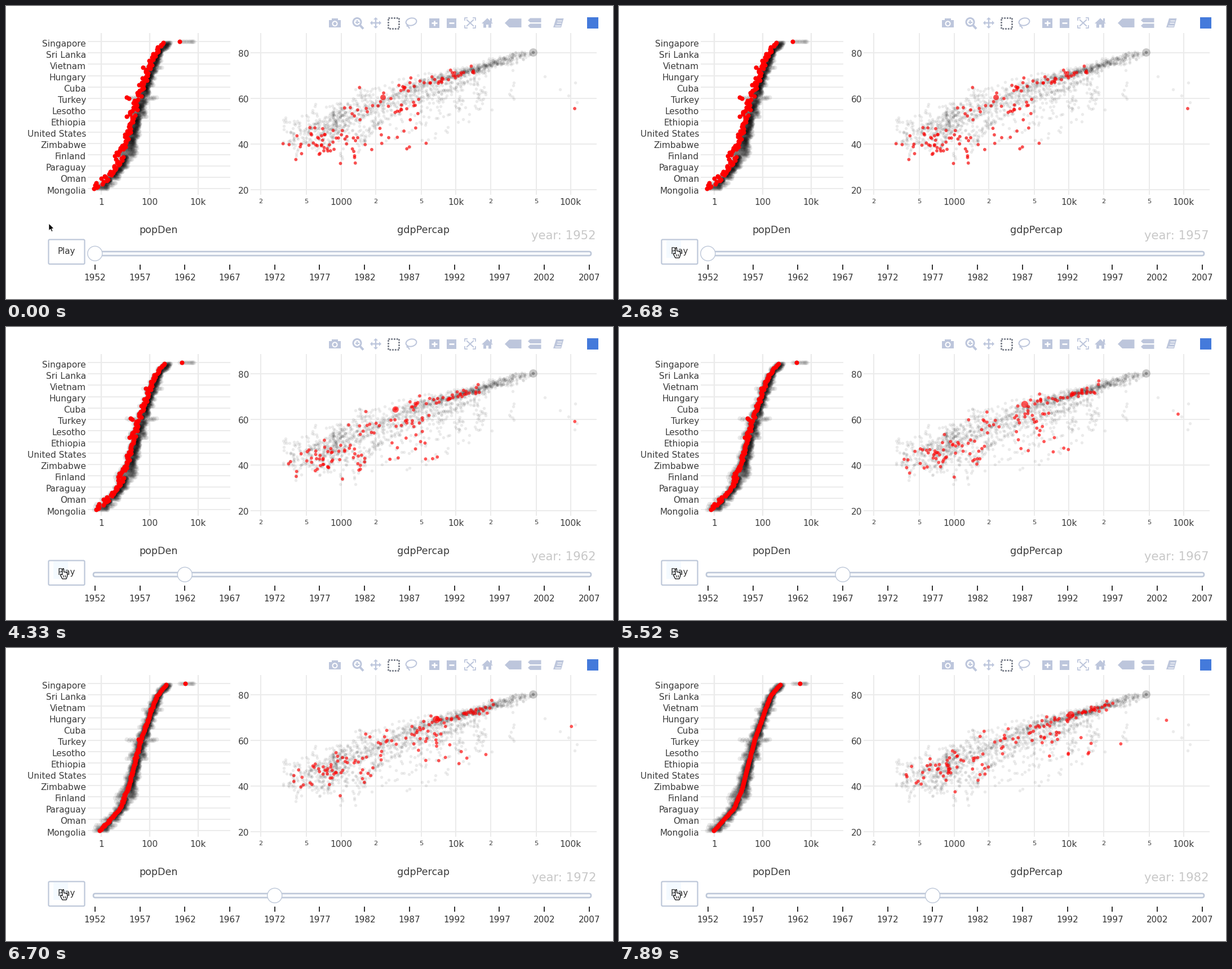
A matplotlib script that plays this animation: 1077x520 px, repeating every 8 s.

```python
import numpy as np
import matplotlib.pyplot as plt
from matplotlib.animation import FuncAnimation
from matplotlib.patches import Circle, Ellipse, FancyBboxPatch, Polygon

W, H, DPI = 1077, 520, 100
PX = 72 / DPI                      # points per pixel
STEP, LOOP = 50, 8000
TICK = LOOP / 54                   # the picture changes only on these beats
INK, RULE, ICON, GRID = "#3c3c3c", "#bec8d9", "#bdc6dc", "#ebebeb"

rng = np.random.default_rng(7)
plt.rcParams["font.family"] = "DejaVu Sans"
fig = plt.figure(figsize=(W / DPI, H / DPI), dpi=DPI, facecolor="white")
ax = fig.add_axes([0, 0, 1, 1])
ax.set(xlim=(0, W), ylim=(H, 0))
ax.axis("off")


# ---- drawing helpers, all in pixels ----
def line(xs, ys, color=ICON, lw=2, z=2, **kw):
    kw.setdefault("solid_capstyle", "butt")
    return ax.plot(xs, ys, color=color, lw=lw * PX, zorder=z, **kw)[0]


def shape(pts, fc=ICON, ec="none", lw=0, z=2):
    return ax.add_patch(Polygon(pts, fc=fc, ec=ec, lw=lw * PX, zorder=z))


def box(x0, y0, x1, y1, **kw):
    return shape([(x0, y0), (x1, y0), (x1, y1), (x0, y1)], **kw)


def disc(x, y, r, fc=ICON, ec="none", lw=0, z=2):
    return ax.add_patch(Circle((x, y), r, fc=fc, ec=ec, lw=lw * PX, zorder=z))


def pill(x0, y0, x1, y1, r, fc, lw):
    style = f"round,pad=0,rounding_size={r}"
    ax.add_patch(FancyBboxPatch((x0, y0), x1 - x0, y1 - y0, boxstyle=style,
                                fc=fc, ec=RULE, lw=lw * PX, zorder=4))


def text(x, y, s, size=15.4, ha="center", color=INK, z=6):
    return ax.text(x, y, s, fontsize=size * PX, ha=ha, va="baseline",
                   color=color, zorder=z)


def dots(x, y, r, color, alpha, z):
    return ax.scatter(x, y, s=(2 * np.asarray(r) * PX) ** 2, c=color,
                      alpha=alpha, linewidths=0, zorder=z)


# ---- axes ----
ROWS, ROW_TOP, ROW_GAP = 131, 63.3, 2.007


def gdp_x(v):
    return 594.5 + 203.7 * (np.log10(v) - 3)


def life_y(v):
    return 83 + (80 - v) * 4.05


def draw_axes():
    names = ["Singapore", "Sri Lanka", "Vietnam", "Hungary", "Cuba", "Turkey",
             "Lesotho", "Ethiopia", "United States", "Zimbabwe", "Finland",
             "Paraguay", "Oman", "Mongolia"]
    for k, name in enumerate(names):
        y = ROW_TOP + 10 * ROW_GAP * k
        line([145, 398], [y, y], GRID, 2, 1)
        text(142, y + 8.3, name, ha="right")
    for x, s in [(169, "1"), (255, "100"), (341, "10k")]:
        line([x, x], [48, 335], GRID, 2.4, 1)
        text(x, 353, s)

    for v in (20, 40, 60, 80):
        line([434, 1048], [life_y(v)] * 2, GRID, 2, 1)
        text(431, life_y(v) + 7, str(v), ha="right")
    for power in (2, 3, 4, 5):
        for lead in (1, 2, 5):
            x = gdp_x(lead * 10 ** power)
            if not 440 < x < 1040:
                continue
            line([x, x], [48, 335], GRID, 2, 1)
            if lead == 1:
                text(x, 353, {3: "1000", 4: "10k", 5: "100k"}[power])
            else:
                text(x, 350, str(lead), 11.4)
    text(271, 403, "popDen", 17.5)
    text(740.5, 403, "gdpPercap", 17.5)


# ---- toolbar ----
def draw_toolbar():
    box(573, 25, 594, 38)
    box(578, 22, 589, 26)
    disc(583.5, 31.3, 5, "white")
    disc(583.5, 31.3, 3)

    disc(623, 28.5, 7, "none", ICON, 3)
    line([628, 634], [34, 40.5], lw=4)
    line([619.5, 626.5], [28.5, 28.5])
    line([623, 623], [25, 32])

    line([649, 663], [30, 30], lw=2.4)
    line([656, 656], [23, 37], lw=2.4)
    for dx, dy in ((1, 0), (-1, 0), (0, 1), (0, -1)):
        shape([(656 + 10 * dx, 30 + 10 * dy),
               (656 + 6 * dx + 4 * dy, 30 + 6 * dy + 4 * dx),
               (656 + 6 * dx - 4 * dy, 30 + 6 * dy - 4 * dx)])

    line([678, 697, 697, 678, 678], [21, 21, 39.5, 39.5, 21], "#767b87", 2.8,
         linestyle=(0, (1, 0.7)), dash_capstyle="butt")

    ax.add_patch(Ellipse((719, 28), 19, 13, angle=-12, fc="none", ec=ICON,
                         lw=2 * PX, zorder=2))
    line([712, 711.5, 714, 716], [32, 35.5, 36.5, 40])

    for x in (751, 781.5):
        box(x, 22, x + 17.5, 38.5)
        line([x + 4, x + 13.5], [30.2, 30.2], "white", 2.6, 3)
    line([759.8, 759.8], [25.5, 35], "white", 2.6, 3)

    for sx in (-1, 1):
        for sy in (-1, 1):
            cx, cy = 823.5 + 9.5 * sx, 30 + 9 * sy
            line([cx - 5 * sx, cx, cx], [cy, cy, cy - 5 * sy], lw=1.8)
            line([823.5, 823.5 + 6.5 * sx], [30, 30 + 6 * sy], lw=2)

    shape([(844, 31), (854, 21.5), (864, 31), (861, 31), (861, 38.5),
           (856, 38.5), (856, 33), (852, 33), (852, 38.5), (847, 38.5),
           (847, 31)])
    box(859, 22, 861.5, 28)

    shape([(885, 30.2), (893, 22.3), (914.5, 22.3), (914.5, 38), (893, 38)])
    for y in (21.5, 31.3):
        shape([(926, y + 3.8), (930, y), (949.5, y), (949.5, y + 7.6),
               (930, y + 7.6)])

    shape([(976, 22), (989.5, 22), (985, 38), (971, 38)])
    line([977.5, 986], [26, 26], "white", 1.3, 3)
    line([976.5, 985], [29.5, 29.5], "white", 1.3, 3)
    line([973.5, 983.5], [35.2, 35.2], "white", 1.3, 3)

    box(1031, 20, 1051, 40, fc="#447adb")


# ---- button and slider ----
def slider_x(k):
    return 157.8 + 79.73 * k


def draw_controls():
    pill(75.5, 414.5, 139.5, 458, 2, "white", 2.2)
    text(107, 440.3, "Play", 15, color="#333333")
    pill(155, 435.8, 1038, 443, 3.5, "#f8fafc", 2.6)
    for k in range(12):
        x = slider_x(k)
        line([x, x], [458.5, 467.5], "#333333", 2, 4)
        text(x, 487, str(1952 + 5 * k), 15.2, color="#333333")


# ---- density panel: rows sorted by their long-run mean ----
row_y = ROW_TOP + ROW_GAP * np.arange(ROWS)
row_mid = np.interp(row_y, [65, 85, 125, 165, 210, 250, 285, 325],
                    [286, 269, 254, 240, 228.5, 218.5, 204, 168])
row_rate = (np.interp(row_y, [63, 150, 170, 324], [1.9, 1.5, 2.3, 2.3])
            * rng.gamma(4, 0.25, ROWS))
row_mid[0], row_rate[0] = 321, 2.9
row_rate[49] = 6.2                 # the one country that fills up fastest


def density_x(p):
    slowed = p - 0.02 * p ** 2
    return row_mid + row_rate * (slowed - 4.4)


# ---- wealth and life panel: p counts five-year periods since 1952 ----
def frontier(x):
    return np.interp(x, [500, 600, 700, 800, 870, 935],
                     [190, 160, 140, 119, 98, 82])


def make_countries():
    """Start points, growth and catch-up rate of each group of countries."""
    poor, middle, rich, oil = 48, 38, 34, 8
    n = poor + middle + rich + oil
    x = np.concatenate([
        np.maximum(rng.normal(562, 36, poor), 488 + 20 * rng.random(poor)),
        rng.uniform(595, 735, middle),
        rng.uniform(695, 835, rich),
        rng.uniform(640, 760, oil)])
    y = np.concatenate([
        rng.normal(247, 17, poor),
        rng.normal(225 - 0.36 * (x[poor:poor + middle] - 595), 28),
        frontier(x[-rich - oil:-oil]) + rng.normal(7, 7, rich),
        rng.uniform(215, 258, oil)])
    y = np.maximum(y, frontier(x) - 10)
    grow = np.concatenate([
        rng.normal(4.5, 5, poor),
        rng.normal(9.5, 4.5, middle),
        rng.normal(11.5 - 0.03 * (x[-rich - oil:-oil] - 765), 2),
        rng.normal(29, 7, oil)])
    kind = np.repeat([0, 1, 2, 3], [poor, middle, rich, oil])
    catch_up = rng.uniform(np.array([0.04, 0.07, 0.1, 0.06])[kind],
                           np.array([0.15, 0.25, 0.2, 0.12])[kind])
    return dict(x=x, y=y, grow=grow, catch_up=catch_up,
                stop=np.where(kind == 3, 5, 11),
                offset=rng.normal(0, np.array([14, 12, 5, 12])[kind]),
                limit=938 - rng.exponential(18, n),
                phase=rng.uniform(0, 2 * np.pi, n))


land = make_countries()


def city_xy(p):
    x = min(669 + 14 * p + 3 * p ** 2, 935)
    return x, frontier(x) + 16 * np.exp(-p)


def emirate_xy(p):
    x = np.interp(p, range(7), [1009, 1013, 998, 983, 1010, 956, 899])
    return x, max(182 - 11.4 * p, 85)


def wealth_xy(p):
    sway = np.sin(1.1 * p + land["phase"]) - np.sin(land["phase"])
    x = land["x"] + land["grow"] * np.minimum(p, land["stop"]) + 4 * sway
    x = np.minimum(x, land["limit"])
    left = np.exp(-land["catch_up"] * p)
    gap = land["y"] - frontier(land["x"])
    y = frontier(x) + gap * left + land["offset"] * (1 - left) - 2.5 * sway
    return np.vstack([np.column_stack([x, y]), emirate_xy(p), city_xy(p)])


red_r = np.full(len(land["x"]) + 2, 2.9)


def draw_history():
    for p in range(12):
        dots(density_x(p), row_y, 4, "black", 0.085, 2)
        dots(*wealth_xy(p).T, 2.7, "black", 0.08, 2)
        dots(*city_xy(p), 4.8 + 0.27 * p, "black", 0.06, 2)


# ---- timeline in ticks ----
MOVES = np.arange(2, 8)
LABELS = [18, 25, 32, 40, 46, 53]
STARTS = [21, 28, 35, 42, 48]
ENDS = LABELS[1:5] + [55]


def passed(times, tick):
    return int(np.searchsorted(times, tick, side="right"))


def progress(tick):
    knots = np.column_stack([STARTS, ENDS]).ravel()
    return np.interp(tick, knots, (np.arange(10) + 1) // 2)


draw_axes()
draw_toolbar()
draw_controls()
draw_history()

red_left = dots(density_x(0), row_y, 4, "red", 1, 3)
red_right = dots(*wealth_xy(0).T, red_r, "red", 0.66, 3)
handle = disc(slider_x(0), 439.3, 13, "white", RULE, 1.4, 5)
year = text(1047, 414, "", 21.2, "right", "#c8c8c8")
hover = box(84, 416, 110, 447, fc="#f4faff", z=5)

ARROW = np.array([(0, 0), (0, 12.5), (3, 10), (5, 14.5), (7, 13.5),
                  (5.2, 9.2), (9, 8.8)])
HAND = np.array([(-1, 0.5), (0.5, 0), (1.5, 1), (2, 6), (5, 6), (7.5, 7.5),
                 (8, 12), (6, 18), (-1, 18), (-4.5, 11.5), (-4, 9.5), (-1, 11)])
arrow = shape(ARROW, "black", "white", 0.8, 8)
hand = shape(HAND, "white", "black", 1.2, 8)
creases = [line([], [], "black", 1, 9) for _ in range(2)]


def draw(i):
    tick = int((i * STEP + STEP - 1) / TICK)
    p = progress(tick)
    red_left.set_offsets(np.column_stack([density_x(p), row_y]))
    red_right.set_offsets(wealth_xy(p))
    red_r[-1] = 5 + 0.5 * min(p, 3)
    red_right.set_sizes((2 * red_r * PX) ** 2)
    handle.center = slider_x(passed(STARTS, tick)), 439.3
    year.set_text(f"year: {1952 + 5 * passed(LABELS, tick)}")

    share = passed(MOVES, tick) / len(MOVES)
    tip = np.array([76, 386]) + np.array([25, 43]) * share
    over = tip[1] > 414
    arrow.set_xy(ARROW + tip)
    hand.set_xy(HAND + tip)
    arrow.set_visible(not over)
    for part in (hand, hover, *creases):
        part.set_visible(over)
    for k, crease in enumerate(creases):
        x = tip[0] + 1 + 2.5 * k
        crease.set_data([x, x], [tip[1] + 11, tip[1] + 15])
    return red_left, red_right, handle, year, hover, arrow, hand, *creases


anim = FuncAnimation(fig, draw, frames=LOOP // STEP, interval=STEP,
                     repeat=True, repeat_delay=0)
plt.show()
```
